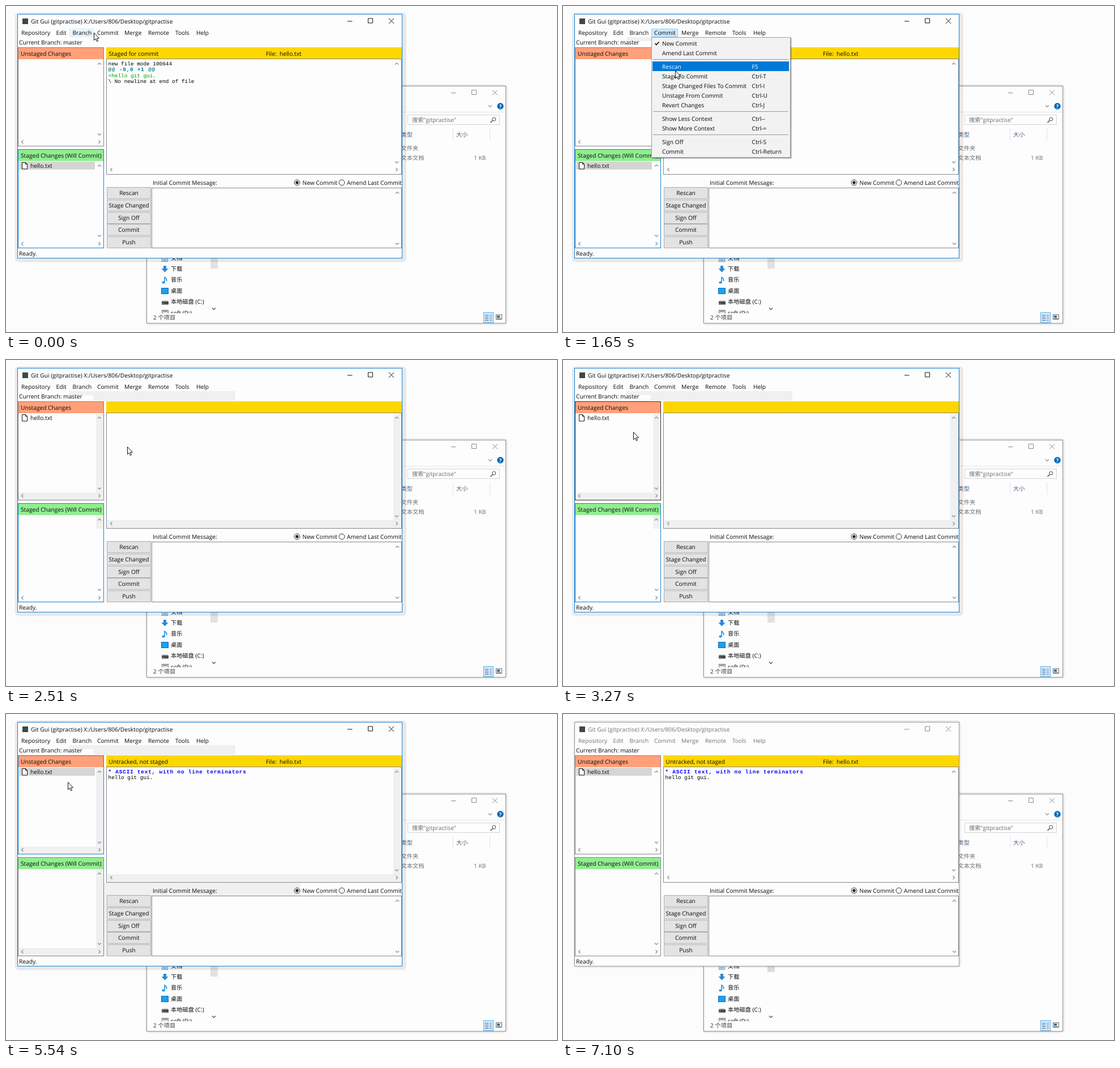
An HTML page that plays this animation: 973x576 px, repeating every 7200 ms.

```html
<!DOCTYPE html>
<html lang="en">
<head>
<meta charset="utf-8">
<title>Git Gui</title>
<style>
  html, body { margin: 0; width: 100%; height: 100%; overflow: hidden; background: #fcfcfc; }
  svg { display: block; width: 973px; height: 576px; }
  text { font: 10.22px "Open Sans", "Noto Sans CJK SC", "Noto Sans CJK", sans-serif; white-space: pre; text-rendering: geometricPrecision; fill: #0a0a0a; }
  .mid { text-anchor: middle; }
  .mono { font: 9.4px "Liberation Mono", monospace; }
  .wide { font-weight: bold; letter-spacing: .8px; }
  .dim { fill: #6d6d6d; }
  .line { fill: none; stroke: #111; }
  .frame { stroke: #1883d7; }
  .inactive .frame { stroke: #9a9a9a; }
  .inactive .bar text { fill: #737373; }
  .inactive .bar .line { stroke: #8a8a8a; }
  .row.hot rect { fill: #0078d7; }
  .row.hot text { fill: #fff; }
</style>
</head>
<body>
<svg id="stage" viewBox="0 0 973 576"></svg>
<script>
const LOOP = 7200, LEAVE = 7100;
const stage = document.getElementById('stage');

// Shape helpers
const rect = (x, y, w, h, fill, more = '') =>
  `<rect x="${x}" y="${y}" width="${w}" height="${h}" fill="${fill}" ${more}/>`;
const box = (x, y, w, h, stroke, fill = 'none', more = '') =>
  rect(x + .5, y + .5, w - 1, h - 1, fill, `stroke="${stroke}" ${more}`);
const path = (d, stroke, width = 1, fill = 'none') =>
  `<path d="${d}" fill="${fill}" stroke="${stroke}" stroke-width="${width}"/>`;
const text = (x, y, s, cls = '', more = '') =>
  `<text x="${x}" y="${y}" class="${cls}" ${more}>${s}</text>`;
const mono = (line, s, color, cls = '') =>
  text(180.5, 104.7 + line * 10.5, s, 'mono ' + cls, `style="fill:${color}"`);
const during = (from, to, body) =>
  `<g data-from="${from}" data-to="${to}">${body}</g>`;

const turns = { up: 0, right: 90, down: 180, left: 270 };
const chevron = (x, y, dir, color = '#8c8c8c') =>
  `<path d="M-3 1.5L0 -1.5L3 1.5" fill="none" stroke="${color}" stroke-width="1.2" transform="translate(${x} ${y}) rotate(${turns[dir]})"/>`;
const scrollers = (left, right, top, bottom, base) =>
  chevron(right, top, 'up') + chevron(right, bottom, 'down') +
  chevron(left, base, 'left') + chevron(right, base, 'right');

const winButtons = (x, y, color) => `<g class="line" style="stroke:${color}">
  <path d="M${x} ${y + .5}h8.5M${x + 36.5} ${y - 4.5}h8v8h-8zM${x + 73} ${y - 4.5}l9 9m0 -9l-9 9"/></g>`;
const shadow = (x, y, w, h, spread) =>
  rect(x - spread, y - 3, w + spread * 2.6, h + 3 + spread * 1.5, '#000', 'rx="7" opacity=".045"') +
  rect(x - spread + 1, y - 2, w + spread * 2.6 - 2, h + 1 + spread * 1.5, '#000', 'rx="6" opacity=".045"');

const fileName = y =>
  path(`M28.5 ${y - 5.5}h6l3 3v8.5h-9zM34.5 ${y - 5.5}v3h3`, '#111', 1, '#fff') + text(43, y + 3.7, 'hello.txt');
const fileRow = y => rect(23, y - 7, 134, 14, '#d5d5d5') + fileName(y);
const radio = (x, on) =>
  `<circle cx="${x}" cy="312" r="4.9" fill="#fff" stroke="#333"/>` +
  (on ? `<circle cx="${x}" cy="312" r="2.7" fill="#222"/>` : '');

function explorer() {
  const side = (y, s) => text(291, y, s);
  return shadow(248, 141, 635, 420, 2) + box(248, 141, 635, 420, '#929292', '#fdfdfd') +
    winButtons(786, 153, '#8a8a8a') +
    chevron(855, 177, 'down') +
    '<circle cx="873" cy="177" r="5.7" fill="#0067b8"/>' +
    text(873, 180.5, '?', 'mid', 'style="fill:#fff;font-weight:bold;font-size:9.5px"') +
    path('M700 187.5H882', '#e4e4e4') +
    box(709, 192, 163, 18, '#d5d5d5') + text(717, 205, '搜索"gitpractise"', 'dim') +
    '<circle cx="861.7" cy="200" r="3" class="line" style="stroke:#444"/>' + path('M859.5 202.3L855.5 206', '#444', 1.4) +
    text(697.5, 231, '类型', '', 'style="fill:#4c607a"') + text(795, 231, '大小', '', 'style="fill:#4c607a"') +
    path('M789.5 216v22M854.5 216v22', '#e4e4e4') +
    text(697.5, 255, '文件夹', 'dim') + text(697.5, 272, '文本文档', 'dim') + text(826, 272, '1 KB', 'dim') +
    during(0, LEAVE, rect(361, 446, 13, 18, '#e2e2e2')) + during(LEAVE, LOOP, rect(361, 446, 13, 10, '#dcdcdc')) +
    '<svg x="250" y="440" width="110" height="103" viewBox="250 440 110 103">' +
    box(275, 442, 11, 10, '#7b8a96', '#fff') + path('M277 447.5h7M277 449.5h7', '#3b8ed0') + side(449, '文档') +
    path('M278 459h5v5h3.5L280.5 470.5L274.5 464H278z', 'none', 0, '#2b88d8') + side(468, '下载') +
    path('M280 488.5V478.5C281 481 285 481.5 283.5 486', '#1a93e8', 1.6) +
    '<ellipse cx="278" cy="488.5" rx="2.6" ry="2" fill="#1a93e8"/>' + side(487.3, '音乐') +
    box(274, 498, 13, 11, '#0a68b4', '#1ba1f2') + side(507, '桌面') +
    rect(275, 522, 12, 5.5, '#4b4b4b') + rect(276, 520, 10, 2, '#c9c9c9') + rect(276, 525, 2, 1, '#7de07d') + side(526.3, '本地磁盘 (C:)') +
    box(275, 537, 12, 8, '#777', '#ddd') + path('M277 539.5h8', '#555') + side(545.5, 'soft (D:)') +
    '</svg>' +
    chevron(367, 535, 'down', '#444') + text(260, 554, '2 个项目', '', 'style="fill:#333"') +
    box(843, 541, 18, 19, '#60b5ea', '#cce8ff') +
    path('M846 546.5h6M846 549.5h6M846 552.5h6M846 555.5h6', '#667') + path('M854 546.5h4M854 549.5h4M854 552.5h4M854 555.5h4', '#889') +
    box(865, 545, 11, 9, '#666', '#fff') + rect(867, 547, 5, 4, '#2f6f9f') + path('M867 552.5h7', '#777');
}

// Areas repainted in the system grey, with the time each one appears
const greys = () => [
  [120, 112, 55, 91, 7], [2390, 155, 55, 250, 17],
  [2390, 159, 95, 13, 152], [2390, 22, 234, 150, 13], [2390, 684, 95, 14, 202], [2390, 179, 283, 518, 14],
  [2390, 159, 274, 13, 24], [4530, 159, 274, 13, 154], [4530, 22, 413, 150, 14],
  [4530, 173, 298, 347, 23], [4530, 173, 321, 84, 107]
].map(([t, ...r]) => during(t, LEAVE, rect(...r, '#f0f0f0'))).join('');

const panel = (y, h, color, from = 0, to = LOOP) =>
  during(from, to, box(21, y, 152, h, color));

function gui() {
  const menu = [['Repository', 27], ['Edit', 88.5], ['Branch', 117.5], ['Commit', 161], ['Merge', 209], ['Remote', 251], ['Tools', 299], ['Help', 336]];
  const buttons = ['Rescan', 'Stage Changed', 'Sign Off', 'Commit', 'Push'];
  const head = s => text(181.5, 87.7, s) + text(459, 87.7, 'File:') + text(483, 87.7, 'hello.txt');
  return during(0, LEAVE, shadow(20, 14, 680, 432, 4.5)) + during(LEAVE, LOOP, shadow(20, 14, 680, 432, 2)) +
    box(20, 14, 680, 432, '', '#fdfdfd', 'class="frame"') + greys() +
    during(0, 120, box(112, 40, 43, 15, '#d8ecfb', '#e9f5ff')) +
    during(120, 270, box(156, 40, 47, 15, '#d8ecfb', '#e9f5ff')) +
    during(270, 2390, box(156, 40, 47, 15, '#99d1ff', '#cce8ff')) +
    '<g class="bar">' + rect(29, 22, 10, 10, '#3d4a42') +
    text(44, 30.7, 'Git Gui (gitpractise) X:/Users/806/Desktop/gitpractise') +
    menu.map(([s, x]) => text(x, 51, s)).join('') + winButtons(603, 26.5, '') + '</g>' +
    text(23, 67.7, 'Current Branch: master') +

    rect(22, 74, 150, 20, '#ffa07a') + text(26, 88, 'Unstaged Changes') +
    panel(73, 175, '#828790') + panel(73, 175, '#333', 3140, 4530) + panel(73, 175, '#1883d7', 4530, LEAVE) +
    during(2510, 4530, fileName(102)) + during(4530, LOOP, fileRow(102)) +
    scrollers(29, 165, 102, 227, 240) +

    rect(22, 254, 150, 20, '#90ee90') + text(26, 268, 'Staged Changes (Will Commit)') +
    panel(253, 175, '#828790') + panel(253, 175, '#1883d7', 0, 4530) +
    during(0, 2510, fileRow(282)) +
    scrollers(29, 165, 282, 406, 420) +

    rect(177, 73, 522, 21, '#ffd700') + box(177, 93, 522, 205, '#828790') +
    during(0, 2510, head('Staged for commit') +
      mono(0, 'new file mode 100644', '#000') + mono(1, '@@ -0,0 +1 @@', '#008080', 'wide') +
      mono(2, '+hello git gui.', '#00a000') + mono(3, '\\ No newline at end of file', '#000')) +
    during(4530, LOOP, head('Untracked, not staged') +
      mono(0, '* ASCII text, with no line terminators', '#00f', 'wide') + mono(1, 'hello git gui.', '#000')) +
    scrollers(186, 690, 102, 276, 289) +

    text(259, 315.7, 'Initial Commit Message:') +
    radio(514, true) + text(523.5, 315.7, 'New Commit') + radio(593, false) + text(602, 315.7, 'Amend Last Commit') +
    box(257, 321, 442, 107, '#828790', '#fdfdfd') + chevron(691, 330, 'up') + chevron(691, 420, 'down') +
    buttons.map((s, i) => {
      const y = 320 + i * 21.75;
      return box(178, Math.round(y), 78, 21, '#adadad', '#e3e3e3') + text(217, y + 14, s, 'mid');
    }).join('') +
    text(23, 440.5, 'Ready.');
}

const items = [
  ['New Commit', '', 66], ['Amend Last Commit', '', 83],
  ['Rescan', 'F5', 107], ['Stage To Commit', 'Ctrl-T', 124], ['Stage Changed Files To Commit', 'Ctrl-I', 141],
  ['Unstage From Commit', 'Ctrl-U', 158], ['Revert Changes', 'Ctrl-J', 175],
  ['Show Less Context', 'Ctrl--', 199], ['Show More Context', 'Ctrl-=', 216],
  ['Sign Off', 'Ctrl-S', 240], ['Commit', 'Ctrl-Return', 257]
];
const popup = () => '<g id="popup">' +
  rect(158, 57, 246, 213, '#000', 'opacity=".14"') + rect(157, 56, 246, 213, '#000', 'opacity=".3"') +
  box(156, 55, 246, 213, '#a0a0a0', '#f2f2f2') +
  [94, 186, 227].map(y => path(`M159 ${y + .5}H398`, '#999')).join('') +
  items.map(([s, key, y]) =>
    `<g class="row">${rect(158, y - 9, 241, 17, 'none')}${text(175, y + 3.7, s)}${text(333.5, y + 3.7, key)}</g>`).join('') +
  path('M162.5 66L164.8 68.5L169.5 63.5', '#111', 1.7) + '</g>';

stage.innerHTML = rect(0, 0, 973, 576, '#fcfcfc') + explorer() + gui() + popup() +
  '<path id="cursor" d="M.5 .5V13.6L3.4 10.9L5.4 15.6L7.5 14.7L5.5 10.1H9.5Z" fill="#fff" stroke="#111"/>';

// Pointer stops: time, x, y
const stops = [
  [0, 155, 47], [120, 168, 44], [270, 168, 43],
  [1410, 178, 62], [1530, 188, 88], [1650, 198, 114], [1770, 206, 126], [1890, 212, 137], [2010, 218, 147], [2130, 222, 154],
  [2510, 214, 153], [2630, 190, 150], [2750, 165, 144],
  [3140, 150, 138], [3270, 124, 127], [3390, 96, 116], [3510, 72, 108], [3630, 55, 103], [3750, 48, 102],
  [5150, 59, 102], [5300, 74, 108], [5420, 91, 115], [5540, 109, 120], [5660, 165, 138], [5780, 260, 168], [5900, 390, 210], [6020, 550, 278],
  [6170, 745, 444], [6320, 856, 523], [6460, 915, 552], [6580, 952, 568], [6700, 980, 590]
];
const cursor = document.getElementById('cursor');
const menuBox = document.getElementById('popup');
const rows = [...menuBox.querySelectorAll('.row')];
const timed = [...stage.querySelectorAll('[data-from]')];

function draw(now) {
  const t = now % LOOP;
  for (const el of timed)
    el.style.display = t >= +el.dataset.from && t < +el.dataset.to ? '' : 'none';
  stage.classList.toggle('inactive', t >= LEAVE);

  const [, x, y] = stops.findLast(s => t >= s[0]);
  cursor.setAttribute('transform', `translate(${x} ${y})`);

  menuBox.style.display = t >= 270 && t < 2390 ? '' : 'none';
  menuBox.style.opacity = t < 390 ? .35 : t < 520 ? .8 : 1;
  rows.forEach((row, i) => row.classList.toggle('hot', Math.abs(y - items[i][2]) <= 8.5));
  requestAnimationFrame(draw);
}
draw(performance.now());
</script>
</body>
</html>
```
